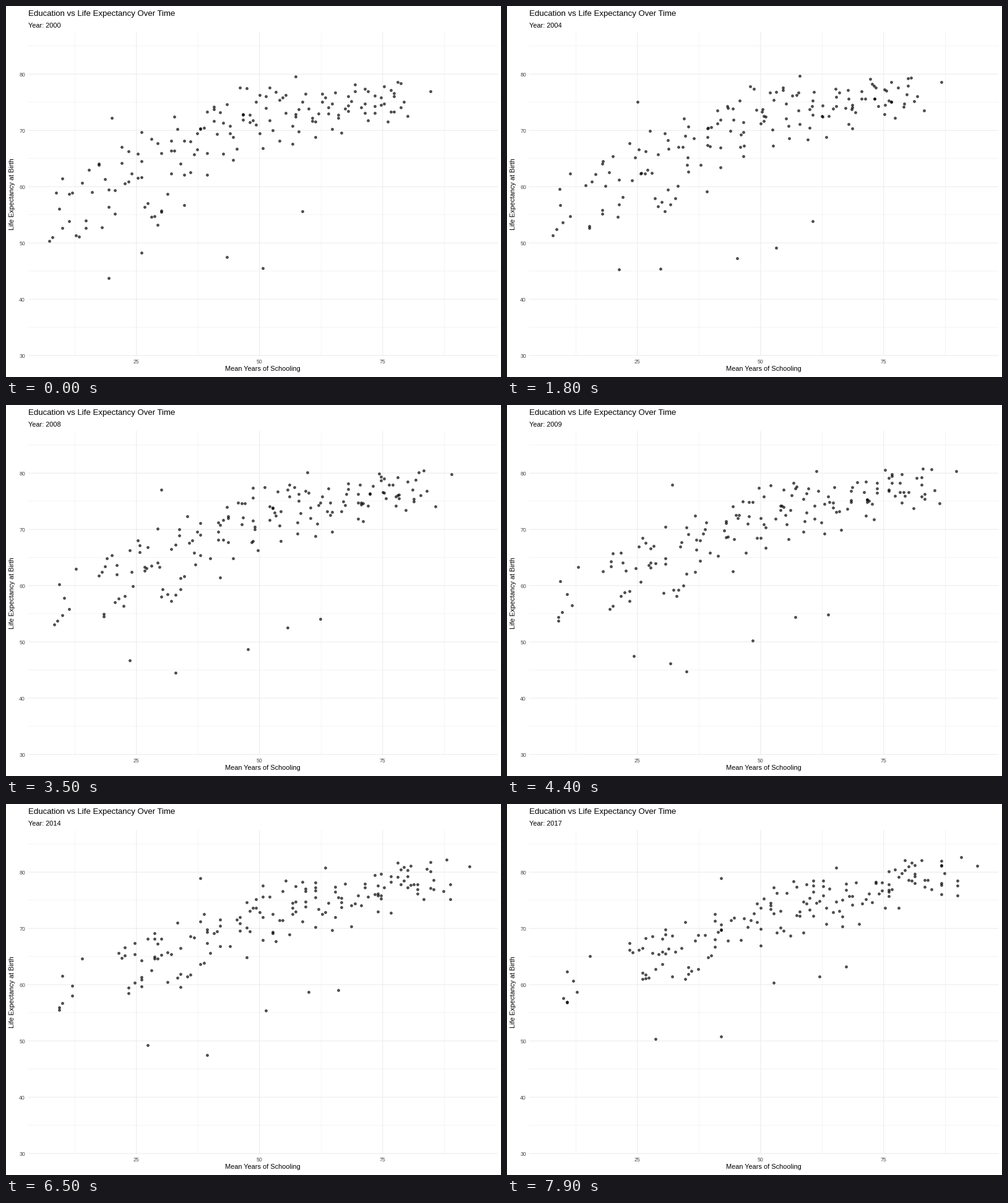
These frames come from a looping animation (800 px wide and 600 px high, 8 s). A matplotlib script:

```python
import matplotlib.pyplot as plt
import numpy as np
from matplotlib.animation import FuncAnimation

FRAMES, INTERVAL = 80, 100
FIRST_YEAR, SPAN = 2000, 17
PT = 0.72  # points per pixel at 100 dpi
LEFT, RIGHT, TOP, BOTTOM = 35.5, 794.5, 42, 566
CLOUD_SIZE = 160
YEARS = np.arange(SPAN + 1)
PROGRESS = (YEARS / SPAN)[:, None]


def px(schooling):
    return 210.8 + 7.96 * (schooling - 25)


def py(life):
    return 565.2 - 9.1 * (life - 30)


def track(start, end, sag=0):
    """Straight path through the years, with life expectancy sagging midway."""
    path = np.array(start) + (np.array(end) - start) * PROGRESS
    path[:, 1] -= sag * 4 * (PROGRESS * (1 - PROGRESS))[:, 0]
    return path


def outlier_states():
    """Countries far from the trend, shape (year, country, 2)."""
    struck = track((26.7, 56.4), (35.3, 63.1))
    struck[10, 1] = 32.5  # a single disaster year
    tracks = [
        struck,
        track((19.3, 43.8), (28.7, 50.4)),
        track((26.0, 48.3), (42.0, 50.8), sag=5),
        track((43.3, 47.5), (52.7, 60.3), sag=4.5),
        track((50.7, 45.5), (62.0, 61.5)),
        track((58.7, 55.6), (67.3, 63.2), sag=5),
        track((20.0, 72.2), (42.0, 78.9), sag=-2),
        track((84.7, 77.0), (94.0, 81.1), sag=-1),
    ]
    return np.stack(tracks, axis=1)


def cloud_states(rng):
    """The main cloud: ranks along a curved trend that shifts up and right."""
    rank = (np.arange(CLOUD_SIZE) + 0.5) / CLOUD_SIZE
    late_rank = np.clip(rank + rng.normal(0, 0.03, CLOUD_SIZE), 0, 1)
    x0 = np.interp(rank, (0, 0.19, 0.56, 0.92, 1), (7, 25, 50, 75, 80))
    x1 = np.interp(late_rank, (0, 0.08, 0.40, 0.78, 1), (10, 25, 50, 75, 90))

    bends = (7, 25, 35, 45, 55, 70, 85)
    offset = rng.triangular(-2, 0.2, 1.9, CLOUD_SIZE)
    spread0 = np.interp(x0, (10, 35, 45, 80), (5, 6, 4, 3.2))
    y0 = np.interp(x0, bends, (55, 61, 65, 72, 73, 74, 78)) + offset * spread0
    y1 = np.interp(x1, bends, (59, 64.5, 66.5, 69, 74, 75.5, 80)) + offset * 3.3

    t = PROGRESS ** rng.uniform(0.75, 1.3, CLOUD_SIZE)
    x = x0 + (x1 - x0) * t + rng.normal(0, 0.3, t.shape)
    y = y0 + (y1 - y0) * t + rng.normal(0, 0.15, t.shape)
    return np.stack([x, y], axis=-1)


def yearly_states():
    cloud = cloud_states(np.random.default_rng(8))
    states = np.concatenate([outlier_states(), cloud], axis=1)
    # The index moves in steps of two thirds, life expectancy in tenths.
    x = np.round(states[..., 0] * 1.5) / 1.5
    y = np.round(states[..., 1], 1)
    return np.stack([px(x), py(y)], axis=-1)


STATES = yearly_states()
KEY_FRAMES = np.round(YEARS * (FRAMES - 1) / SPAN)

plt.rcParams["font.family"] = "Liberation Sans"
fig = plt.figure(figsize=(8, 6), dpi=100, facecolor="white")
ax = fig.add_axes((0, 0, 1, 1))
ax.set(xlim=(0, 800), ylim=(600, 0))
ax.axis("off")


def label(x, y, text, size, **style):
    return ax.text(x, y, text, fontsize=size * PT, **style)


def draw_grid():
    for x_start, y_start, width in ((12.5, 35, 0.53), (25, 30, 1.07)):
        style = dict(color="#ebebeb", lw=width * PT, zorder=width, snap=False)
        ax.vlines(px(np.arange(x_start, 90, 25)), TOP, BOTTOM, **style)
        ax.hlines(py(np.arange(y_start, 90, 10)), LEFT, RIGHT, **style)


def draw_labels():
    grey = "#4d4d4d"
    for v in (25, 50, 75):
        label(px(v), 578, str(v), 8.8, color=grey, ha="center")
    for v in range(30, 90, 10):
        label(31, py(v) + 3.5, str(v), 8.8, color=grey, ha="right")
    label(35.5, 16, "Education vs Life Expectancy Over Time", 13.2)
    label(415, 590, "Mean Years of Schooling", 11, ha="center")
    label(10, 304, "Life Expectancy at Birth", 11,
          rotation=90, ha="center", va="center")


draw_grid()
draw_labels()
subtitle = label(35.5, 35, "", 11)
dots = ax.scatter(*STATES[0].T, s=(4.8 * PT) ** 2, color="black", alpha=0.7,
                  linewidths=0, snap=False, zorder=3)


def update(frame):
    i = min(np.searchsorted(KEY_FRAMES, frame, side="right") - 1, SPAN - 1)
    part = (frame - KEY_FRAMES[i]) / (KEY_FRAMES[i + 1] - KEY_FRAMES[i])
    dots.set_offsets(STATES[i] * (1 - part) + STATES[i + 1] * part)
    year = FIRST_YEAR + round(SPAN * frame / (FRAMES - 1))
    subtitle.set_text(f"Year: {year}")
    return dots, subtitle


animation = FuncAnimation(fig, update, frames=FRAMES, interval=INTERVAL,
                          repeat=True, repeat_delay=0)
plt.show()
```
